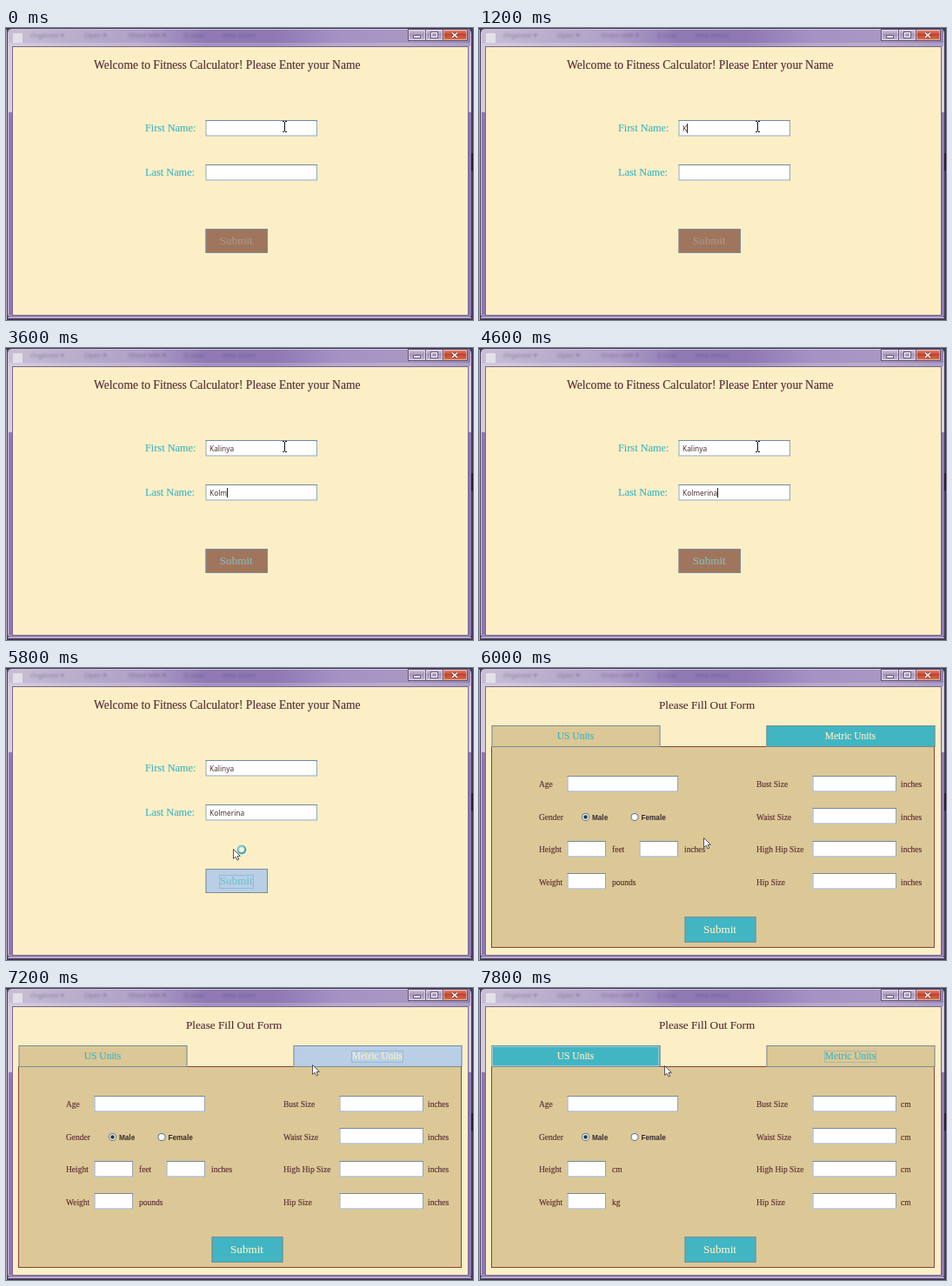
Recreate the animation shown at these times as an HTML page with a canvas. Size 537 px wide and 336 px high, loop 8 s.

```html
<!DOCTYPE html>
<html lang="en">
<head>
<meta charset="utf-8">
<title>Fitness form</title>
<style>
html, body { margin: 0; width: 100%; height: 100%; overflow: hidden; background: #fcefc6; }
canvas { display: block; }
</style>
</head>
<body>
<canvas id="stage" width="537" height="336"></canvas>
<script>
const g = document.getElementById('stage').getContext('2d');
const LOOP = 8000, STEP = 200;
const SERIF = '"Liberation Serif", serif', SANS = '"Liberation Sans", sans-serif',
      INPUT = '"Noto Sans", sans-serif';
const CREAM = '#fcefc6', TAN = '#dcc896', TEAL = '#41b5c2', INK = '#5a2d36',
      PRESSED = '#b8cfe5', EDGE = '#7a8a99';
const FIRST = 'Kalinya', LAST = 'Kolmerina';

function rect(x, y, w, h, fill) {
  g.fillStyle = fill;
  g.fillRect(x, y, w, h);
}

function outline(x, y, w, h, color, dash = []) {
  g.strokeStyle = color;
  g.lineWidth = 1;
  g.setLineDash(dash);
  g.strokeRect(x + .5, y + .5, w - 1, h - 1);
  g.setLineDash([]);
}

function line(color, width, ...pts) {
  g.strokeStyle = color;
  g.lineWidth = width;
  g.beginPath();
  pts.forEach(([x, y]) => g.lineTo(x, y));
  g.stroke();
}

function disc(x, y, r, fill) {
  g.fillStyle = fill;
  g.beginPath();
  g.arc(x, y, r, 0, 7);
  g.fill();
}

function text(s, x, y, size, color = INK, family = SERIF, weight = '') {
  g.font = `${weight} ${size}px ${family}`;
  g.fillStyle = color;
  g.fillText(s, x, y);
  if (family === SERIF) {
    g.strokeStyle = color;
    g.lineWidth = .15;
    g.strokeText(s, x, y);
  }
  return g.measureText(s).width;
}

function fade(x0, y0, x1, y1, ...colors) {
  const f = g.createLinearGradient(x0, y0, x1, y1);
  colors.forEach((c, i) => f.addColorStop(i / (colors.length - 1), c));
  return f;
}

function field(x, y, w, value = '', caret = false) {
  rect(x + .5, y, w - .5, 18.5, '#fff');
  outline(x + .5, y, w - .5, 18.5, '#8fa6b8');
  rect(x + .5, y, w - .5, 1, '#73899a');
  const tw = text(value, x + 5, y + 12.5, 8.3, '#4b3033', INPUT);
  if (caret) rect(Math.round(x + 5 + tw), y + 4, 1, 11, '#222');
}

function button(label, x, y, w, h, size, fill, color, focus = false) {
  rect(x + .5, y, w, h, fill);
  outline(x + .5, y, w, h, EDGE);
  g.textAlign = 'center';
  const cx = x + w / 2, base = y + h / 2 + size * .31;
  const tw = text(label, cx, base, size, color);
  g.textAlign = 'left';
  if (focus) outline(Math.round(cx - tw / 2) - 1, Math.round(base - size * .88), Math.round(tw) + 2, Math.round(size * 1.25), '#7b9fc6', [1, 1]);
}

function caption(x, w, fill) {
  rect(x, 2, w, 12, fill);
  outline(x, 1, w, 14, '#62536f');
  outline(x + 1, 2, w - 2, 12, '#ffffff70');
}

function windowFrame() {
  rect(0, 0, 537, 336, '#453a55');
  rect(0, 2, 1, 334, '#b9b4c4');
  g.fillStyle = '#cfc6dc';
  g.beginPath();
  g.roundRect(2, 1, 533, 333, 5);
  g.fill();
  rect(3, 2, 531, 19, fade(0, 0, 537, 0, '#c9c0d6', '#b9aecb', '#b0a1c8', '#9079b5', '#8f77b4', '#a692c4', '#a897c2', '#9685b4'));
  rect(3, 17, 531, 4, '#ffffff30');
  g.globalAlpha = .45;
  g.filter = 'blur(1px)';
  [['Organize ▾', 28], ['Open ▾', 90], ['Share with ▾', 140], ['E-mail', 205], ['New folder', 249]]
    .forEach(([s, x]) => text(s, x, 11, 8, '#54446f', SANS));
  g.filter = 'none';
  g.globalAlpha = 1;
  // Glass sides are pale above and purple below
  for (const x of [3, 531]) {
    rect(x, 21, 4, 76, '#d5cddf');
    rect(x, 97, 4, 234, '#9079b3');
  }
  rect(3, 330, 531, 3, '#9c88bb');
  rect(2, 333, 533, 1, '#d0c6de');
  rect(535, 144, 2, 20, '#221a2b');
  rect(7, 21, 525, 310, '#76658c');
  rect(8, 22, 523, 308, CREAM);

  rect(8, 6, 11, 11, '#e4e0e9');

  const gray = fade(0, 1, 0, 14, '#d8cfe3', '#a797bd', '#c2b5d4');
  caption(462, 21, gray);
  caption(482, 21, gray);
  caption(502, 29, fade(0, 1, 0, 14, '#e5a08e', '#c4432c', '#d77450'));
  rect(468, 8, 9, 4, '#665b75');
  rect(469, 9, 7, 2, '#fff');
  outline(488, 4, 9, 8, '#665b75');
  outline(489, 5, 7, 6, '#fff');
  for (const [c, w] of [['#6b3438', 3], ['#fff', 1.6]]) {
    line(c, w, [513, 5.5], [519, 11]);
    line(c, w, [519, 5.5], [513, 11]);
  }
}

// The part of s whose keys are pressed by time t
const typed = (s, times, t) => s.slice(0, times.filter(k => k <= t).length);
const firstKeys = [...FIRST].map((_, i) => 1200 + i * 200);
const lastKeys = [3000, 3200, 3400, 3600, 3800, 4000, 4000, 4400, 4600];

function nameScreen(t) {
  const first = typed(FIRST, firstKeys, t), last = typed(LAST, lastKeys, t);
  const blink = t >= 400 && t < 800 || t >= 1200 && t < 4800;
  text('Welcome to Fitness Calculator! Please Enter your Name', 101, 47, 13.6);
  text('First Name:', 160, 119, 12.3, TEAL);
  text('Last Name:', 160, 170, 12.3, TEAL);
  field(229, 106, 129, first, blink && t < 2600);
  field(229, 157, 129, last, blink && t >= 2600);
  const down = t >= 5600;
  const color = down ? '#6fc3cf' : last ? '#8abab5' : '#aa9686';
  button('Submit', 229, 231, 71.5, 28, 13.1, down ? PRESSED : '#a0755d', color, down);
}

function radio(x, label, on) {
  disc(x, 171.5, 4.5, '#63788a');
  disc(x, 171.5, 3.5, '#f5f8fa');
  if (on) disc(x, 171.5, 2.2, '#24384a');
  text(label, x + 7.5, 175, 8.2, '#352b30', SANS, 'bold');
}

function formScreen(t) {
  const metric = t >= 7400, down = t >= 7200 && !metric;
  const label = (s, x, y) => text(s, x, y, 9.5);
  text('Please Fill Out Form', 207, 47, 13.2);
  rect(14, 90, 510, 232, TAN);
  outline(14, 90, 510, 232, '#8a3f38');
  button('US Units', 14, 66, 194, 25, 11.5, metric ? TEAL : TAN, metric ? CREAM : TEAL);
  if (metric) outline(15, 67, 192, 23, '#9cc9dc');
  button('Metric Units', 330, 66, 194, 25, 11.5, down ? PRESSED : metric ? TAN : TEAL,
    metric ? TEAL : CREAM, t >= 7200);

  ['Age', 'Gender', 'Height', 'Weight'].forEach((s, i) => label(s, 69, 137 + i * 37.5));
  field(101, 124, 128);
  radio(122.5, 'Male', true);
  radio(179, 'Female', false);
  field(101, 199, 45);
  field(101, 236, 45);
  label(metric ? 'cm' : 'feet', 153, 212);
  label(metric ? 'kg' : 'pounds', 153, 249.5);
  if (!metric) {
    field(184, 199, 45);
    label('inches', 236, 212);
  }
  ['Bust Size', 'Waist Size', 'High Hip Size', 'Hip Size'].forEach((s, i) => {
    label(s, 319, 137 + i * 37.5);
    field(383, Math.floor(124 + i * 37.5), 97);
    label(metric ? 'cm' : 'inches', 485, 137 + i * 37.5);
  });
  button('Submit', 236, 286, 82, 30, 13.1, TEAL, CREAM);
}

// Pointer path: time, x, y
const path = [[4800, 320, 113], [5400, 264, 240], [5600, 263, 238], [5800, 261, 208],
  [6000, 258, 195], [6200, 258, 194], [7000, 352, 88], [7400, 352, 88], [7800, 213, 89]];

function pointerAt(t) {
  const i = path.findIndex(p => p[0] >= t);
  if (i <= 0) return path[0].slice(1);
  const [t0, x0, y0] = path[i - 1], [t1, x1, y1] = path[i];
  const k = (t - t0) / (t1 - t0), e = k * k * (3 - 2 * k);
  return [x0 + (x1 - x0) * e, y0 + (y1 - y0) * e];
}

function pointer(t) {
  const [x, y] = pointerAt(t);
  g.save();
  g.translate(Math.round(x), Math.round(y));
  if (t < 5000) {
    rect(0, -5, 1, 11, '#111');
    for (const end of [-6, 6]) {
      rect(-2, end, 2, 1, '#111');
      rect(1, end, 2, 1, '#111');
    }
  } else {
    g.beginPath();
    [[0, 0], [0, 11], [2.6, 8.7], [4.5, 12.5], [6.3, 11.6], [4.5, 8], [7.8, 7.8]]
      .forEach(([px, py]) => g.lineTo(px + .5, py + .5));
    g.closePath();
    g.fillStyle = '#fff';
    g.fill();
    g.strokeStyle = '#453e4a';
    g.lineWidth = .9;
    g.stroke();
    if (t === 5800) {
      disc(10, 1, 5.2, '#2f9aa9');
      disc(9.5, .5, 4.2, '#8fd0d6');
      disc(10, 1, 2.8, '#fbf6e4');
    }
  }
  g.restore();
}

function draw(now) {
  const t = Math.floor(now % LOOP / STEP) * STEP;
  windowFrame();
  (t < 6000 ? nameScreen : formScreen)(t);
  pointer(t);
}

const start = performance.now();
function tick() {
  draw(performance.now() - start);
  requestAnimationFrame(tick);
}
tick();
</script>
</body>
</html>
```
